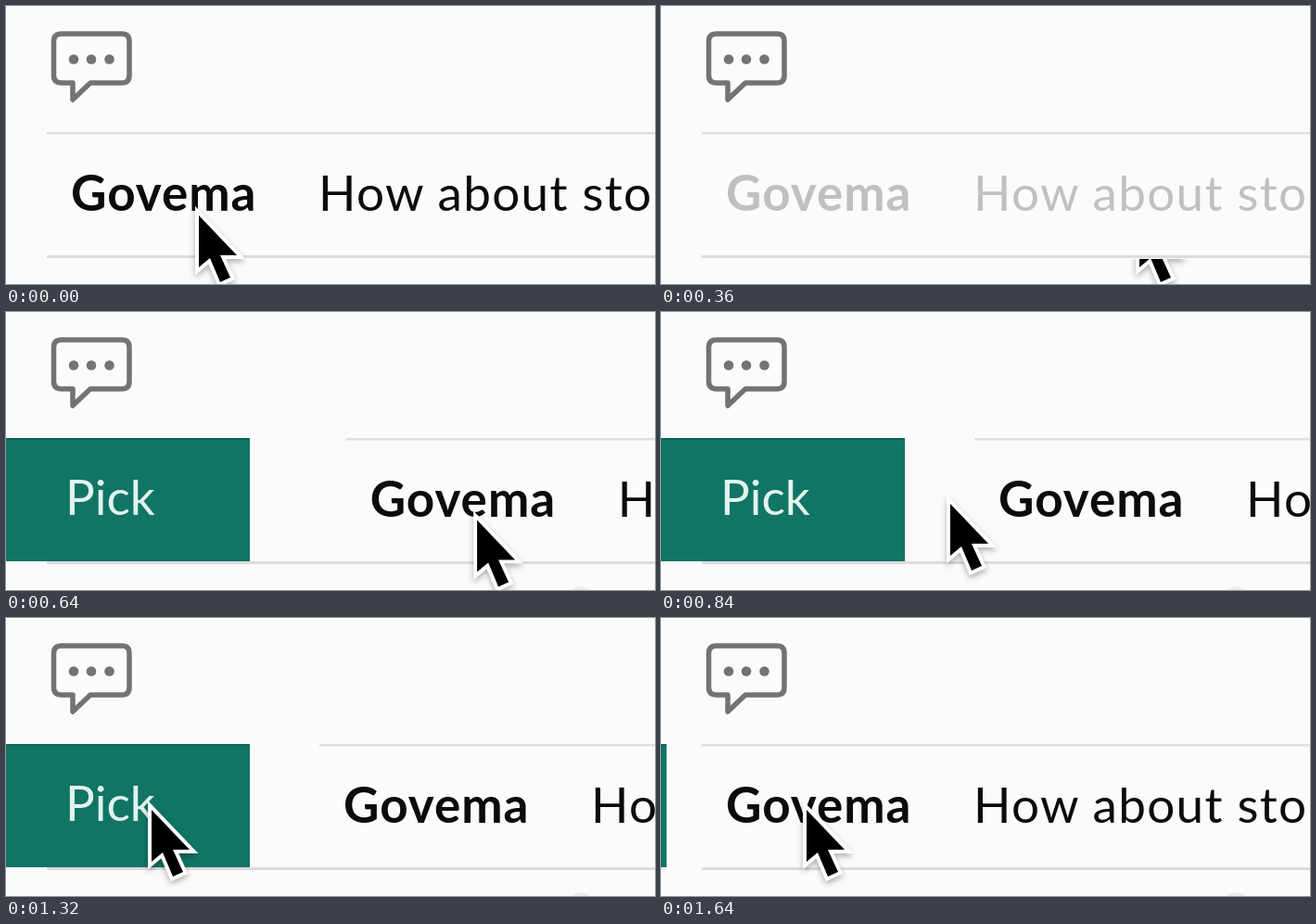
Recreate the animation shown at these times as an HTML page. Size 700 px wide and 300 px high, loop 1.88 s.

```html
<!DOCTYPE html>
<html lang="en">
<head>
<meta charset="utf-8">
<title>Swipe to pick</title>
<style>
  html, body { margin: 0; width: 100%; height: 100%; overflow: hidden; background: #fbfbfb; }
  svg { display: block; width: 700px; height: 300px; }
  text { font: 400 53px Lato, "Open Sans", sans-serif; letter-spacing: 1.3px; fill: #0b0b0b; }
  .name { font-weight: 700; letter-spacing: 1px; }
  .pick { fill: #e2f3ee; letter-spacing: 0; }
  .icon { fill: none; stroke: #747273; stroke-width: 5.5; stroke-linejoin: round; }
  .arrow { stroke: #fff; stroke-width: 8; paint-order: stroke; filter: drop-shadow(0 3px 3px rgba(0, 0, 0, .3)); }
</style>
</head>
<body>
<svg viewBox="0 0 700 300">
  <defs>
    <clipPath id="below"><rect y="273" width="700" height="27"/></clipPath>
  </defs>
  <rect width="700" height="300" fill="#fbfbfb"/>

  <path class="icon" d="M60 30H125Q133 30 133 38V75Q133 83 125 83H91L72 101V83H60Q51.500 83 51.500 75V38Q51.500 30 60 30Z"/>
  <g fill="#747273">
    <circle cx="73" cy="57.5" r="5.3"/><circle cx="92" cy="57.5" r="5.3"/><circle cx="111.500" cy="57.5" r="5.3"/>
  </g>

  <ellipse id="hint" cx="620" cy="299" rx="9" ry="2.500" fill="#ececec"/>
  <rect x="44" y="269" width="656" height="3" fill="#dcdcdc"/>

  <g id="row">
    <rect x="44" y="136" width="656" height="2.500" fill="#e0e0e0"/>
    <g id="words">
      <text class="name" x="70" y="221">Govema</text>
      <text x="337" y="221">How about sto</text>
    </g>
  </g>

  <g id="panel">
    <rect y="136" width="263" height="133" fill="#117565"/>
    <rect y="136" width="263" height="1.500" fill="#0d6153"/>
    <text class="pick" x="64" y="219">Pick</text>
  </g>

  <g id="mask">
    <path id="cursor" class="arrow" d="M0 0V56L12 46L23 72L34 67L23 43H41Z"/>
  </g>
</svg>
<script>
const LOOP = 1880, STEP = 40;
const $ = id => document.getElementById(id);

const smooth = u => u * u * (3 - 2 * u);
const out = u => 1 - (1 - u) ** 5;

// eased progress from 0 to 1 between two times
const ramp = (t, from, to, ease = smooth) =>
  ease(Math.min(1, Math.max(0, (t - from) / (to - from))));

function move(id, x, y = 0) {
  $(id).setAttribute("transform", `translate(${x} ${y})`);
}

function draw(now) {
  const t = Math.floor(now % LOOP / STEP) * STEP;
  const open = ramp(t, 400, 520);

  // overshoot, settle, then close
  move("row", 328 * open - 34 * ramp(t, 600, 760) - 294 * ramp(t, 1380, 1640));
  move("panel", 263 * (open - 1) - 257 * ramp(t, 1400, 1640, out));

  // drag right, sweep back left, return to the button
  move("cursor",
    208 + 308 * ramp(t, 60, 340) - 434 * ramp(t, 600, 1100) + 75 * ramp(t, 1140, 1320),
    226 - 19 * ramp(t, 600, 840));

  $("words").setAttribute("opacity", 1 - .76 * (ramp(t, 40, 360) - open));
  // the pressed row covers the upper part of the pointer
  $("mask").setAttribute("clip-path", t >= 160 && t < 640 ? "url(#below)" : "none");
  $("hint").setAttribute("opacity", t >= 640 ? 1 : 0);
}

const start = performance.now();
function tick() {
  draw(performance.now() - start);
  requestAnimationFrame(tick);
}
tick();
</script>
</body>
</html>
```
